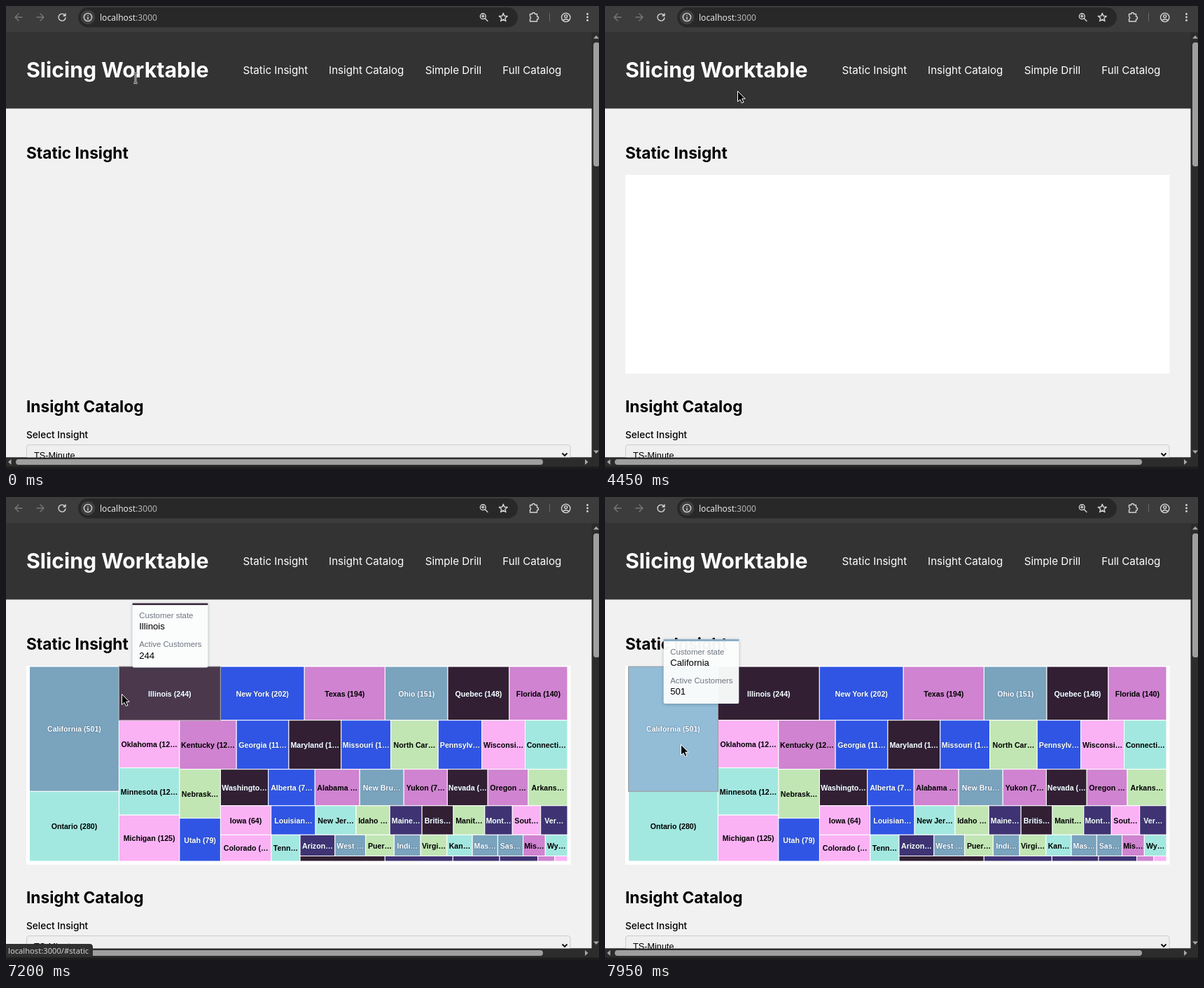
An HTML page for the animation above (8000 ms loop, 847x661 px).

```html
<!DOCTYPE html>
<html lang="en">
<head>
<meta charset="utf-8">
<title>Insight demo</title>
<style>
html, body { margin: 0; width: 100%; height: 100%; overflow: hidden; background: #333; }
svg { display: block; width: 847px; height: 661px; }
text { white-space: pre; }
.ui { font-family: Inter, sans-serif; font-optical-sizing: none; }
.chrome { font-family: "Noto Sans", sans-serif; }
.arial { font-family: "Liberation Sans", Arial, sans-serif; }
.cell { font-size: 10.65px; font-weight: 700; text-anchor: middle; }
.light { fill: #fff; stroke: rgba(20, 56, 93, .35); stroke-width: 1.2; paint-order: stroke; }
.icon { fill: none; stroke: #d6d6d6; stroke-width: 1.4; stroke-linecap: round; stroke-linejoin: round; }
.off { stroke: #777; }
#tip { filter: drop-shadow(0 1px 2px rgba(20, 56, 93, .35)); }
</style>
</head>
<body>
<svg id="stage" viewBox="0 0 847 661" xmlns="http://www.w3.org/2000/svg"></svg>
<script>
const LOOP = 8000, STEP = 50;
const REM = 15.15;
const LEFT = 28.9;
const COLORS = {
  s: '#7aa3bd', a: '#a3e8e0', d: '#321f33', b: '#3055e5',
  v: '#cf83d0', p: '#fab2f5', g: '#c1e6b4', u: '#3f3373'
};

const rect = (x, y, w, h, fill, more = '') =>
  `<rect x="${x}" y="${y}" width="${w}" height="${h}" fill="${fill}" ${more}/>`;
const text = (x, y, str, cls, size, fill, weight = 400) =>
  `<text x="${x}" y="${y}" class="${cls}" font-size="${size}" fill="${fill}" font-weight="${weight}">${str}</text>`;
const path = (d, more) => `<path d="${d}" ${more}/>`;
const dot = (x, y, r, more) => `<circle cx="${x}" cy="${y}" r="${r}" ${more}/>`;
const clamp = v => Math.max(0, Math.min(1, v));

// Chart data: each line is one strip of the treemap, each item a colour, a value and a label
const STRIPS = `col:s501 California (501)|a280 Ontario (280)
row:d244 Illinois (244)|b202 New York (202)|v194 Texas (194)|s151 Ohio (151)|d148 Quebec (148)|v140 Florida (140)
col:p129 Oklahoma (12…|a128 Minnesota (12…|p125 Michigan (125)
row:v125 Kentucky (12…|b115 Georgia (11…|d115 Maryland (1…|b109 Missouri (1…|g104 North Car…|b96 Pennsylv…|p95 Wisconsi…|a93 Connecti…
col:g90 Nebrask…|b79 Utah (79)
row:d78 Washingto…|b76 Alberta (7…|v73 Alabama …|s72 New Bru…|v71 Yukon (7…|d66 Nevada (…|v66 Oregon …|g64 Arkans…
row:p66 Iowa (64)|b58 Louisian…|a53 New Jer…|g44 Idaho …|u42 Maine…|d41 Britis…|g41 Manit…|u36 Mont…|p37 Sout…|u35 Ver…
col:p60 Colorado (…
col:a34 Tenn…
row:u33 Arizon…|s29 West …|g27 Puer…|s25 Indi…|g25 Virgi…|a24 Kan…|s24 Mas…|s24 Sas…|v21 Mis…|a21 Wy…
row:d20 |u16 |u11 |u9 |v4 |p3 `;

// Each strip is cut from the free area, as thick as its total value needs
function layout(x, y, w, h) {
  const sum = items => items.reduce((n, item) => n + item.value, 0);
  const strips = STRIPS.split('\n').map(line => ({
    col: line.startsWith('col'),
    items: line.slice(4).split('|').map(s => {
      const [, color, value, label] = s.match(/(\w)(\d+) (.*)/);
      return { color, value: +value, label };
    })
  }));
  const unit = w * h / sum(strips.flatMap(s => s.items));
  const cells = [];
  for (const { col, items } of strips) {
    const thick = sum(items) * unit / (col ? h : w);
    let at = col ? y : x;
    for (const item of items) {
      const len = item.value * unit / thick;
      cells.push(col ? { ...item, x, y: at, w: thick, h: len } : { ...item, x: at, y, w: len, h: thick });
      at += len;
    }
    if (col) { x += thick; w -= thick; } else { y += thick; h -= thick; }
  }
  return cells;
}
const cells = layout(33.5, 242, 768.5, 278);

const brighten = hex => '#' + hex.slice(1).match(/../g)
  .map(h => Math.min(255, parseInt(h, 16) + 25).toString(16).padStart(2, '0')).join('');

function cellShape({ x, y, w, h, color, label }, hot) {
  const fill = hot ? brighten(COLORS[color]) : COLORS[color];
  const cls = 'arial cell' + ('sdbu'.includes(color) ? ' light' : '');
  return rect(x, y, w, h, fill, `stroke="${hot ? '#999' : '#fff'}"`)
    + `<text class="${cls}" x="${x + w / 2}" y="${y + h / 2 + 4.2}">${label}</text>`;
}

function star(x, y, outer, inner) {
  const points = [...Array(10)].map((_, i) => {
    const r = i % 2 ? inner : outer, a = (i - 2.5) * Math.PI / 5;
    return `${x + r * Math.cos(a)} ${y + r * Math.sin(a)}`;
  });
  return path(`M${points.join('L')}Z`, 'class="icon"');
}

function browserBar() {
  return rect(0, 0, 847, 37.5, '#3c3c3c') + rect(103, 2, 628, 28.5, '#282828', 'rx="14.2"')
    + path('M23 16H13m5-5-5 5 5 5M44 16h10m-5-5 5 5-5 5', 'class="icon off"')
    + path('M84 13a5 5 0 1 0 1 4m0-6v3h-3', 'class="icon"')
    + dot(117, 16, 10.3, 'fill="#3f3f3f"') + dot(117, 16, 5.6, 'class="icon"')
    + path('M117 16v3m0-5.500v0', 'class="icon"')
    + text(134, 20.6, 'localhost<tspan fill="#b4b4b4">:3000</tspan>', 'chrome', 12.1, '#e8e8e8')
    + dot(681.3, 14.7, 3.9, 'class="icon"') + path('M684 17.500l4 4m-8.500-7h3.500m-1.750-1.750v3.500', 'class="icon"')
    + star(710.3, 16.5, 6.3, 2.7)
    + path('M748.500 11.500h3a2 2 0 0 1 4 0h3v3.500a2 2 0 0 1 0 4v3h-10v-3.500a2 2 0 0 0 0-3.500z', 'class="icon"')
    + rect(776, 10, 1, 12, '#6a6a6a')
    + dot(799.7, 16.3, 6.2, 'class="icon"') + dot(799.7, 14.6, 2, 'class="icon"') + path('M795.500 20.500q4-3.500 8.500 0', 'class="icon"')
    + [-1, 0, 1].map(i => dot(830.5, 16 + 4.5 * i, 1.4, 'fill="#d6d6d6"')).join('');
}

function page() {
  const nav = { 'Static Insight': 338.6, 'Insight Catalog': 461.1, 'Simple Drill': 598.7, 'Full Catalog': 709.3 };
  const heading = (y, str) => text(LEFT, y, str, 'ui', 1.5 * REM, '#000', 700);
  return rect(0, 0, 847, 661, '#2c2c2c') + rect(0, 37.5, 836.5, 109, '#333') + rect(0, 146.4, 836.5, 498.1, '#f1f1f1')
    + text(LEFT, 101.8, 'Slicing Worktable', 'ui', 2 * REM, '#fff', 700)
    + Object.entries(nav).map(([s, x]) => text(x, 97.4, s, 'ui', REM, '#fff')).join('')
    + heading(217.5, 'Static Insight') + heading(580.3, 'Insight Catalog')
    + text(LEFT, 617, 'Select Insight', 'ui', .9 * REM, '#000', 500)
    + rect(29.5, 626.5, 776.5, 29, '#efefef', 'stroke="#ccc" rx="3.5"')
    + text(40, 645.6, 'TS-Minute', 'arial', 12.7, '#000')
    + path('M794.500 638.500l3.500 3.500 3.500-3.500', 'fill="none" stroke="#000" stroke-width="1.8"');
}

function scrollbars() {
  const arrow = (x, y, turn) => path('M-4 2h8l-4-4.500z', `fill="#a8a8a8" transform="translate(${x} ${y}) rotate(${turn})"`);
  return rect(0, 644.5, 847, 16.5, '#2c2c2c') + rect(0, 657.5, 847, 3.5, '#1d1d1d')
    + rect(839, 52, 9, 177, '#9f9f9f', 'rx="4"') + rect(14, 647, 753, 8, '#9f9f9f', 'rx="4"')
    + arrow(843, 44.5, 0) + arrow(843, 636.5, 180) + arrow(5.5, 651, -90) + arrow(829, 651, 90);
}

const BEAM = 'M-2.500-7h1.500q1 0 1 1 0-1 1-1h1.500M0-6V6m-2.500 1h1.500q1 0 1-1 0 1 1 1h1.500';
const CURSORS = {
  arrow: path('M.500.500v15l3.500-3 2.300 5 2.700-1.200-2.300-5h4.500z', 'fill="#000" stroke="#fff" stroke-linejoin="round"'),
  beam: path(BEAM, 'fill="none" stroke="#fff" stroke-width="2.6"') + path(BEAM, 'fill="none" stroke="#111"'),
  hand: path('M-1.500 1.500q1.500-2 3 0v5.500l6 1q2 0 2 2v3q0 5.500-5 5.500h-2.500q-2.500 0-4-3l-3.500-4q0-2.500 4 0z', 'fill="#000" stroke="#fff"')
};

// Pointer moves: start, end, x, y; it rests in between
const MOVES = [
  [1250, 1300, 185, 107], [2050, 2250, 188, 115], [2700, 2750, 189, 121],
  [5100, 5500, 175, 192], [5500, 5950, 106, 126], [5950, 6050, 66, 107],
  [6150, 6400, 260, 91], [6400, 6650, 411, 93], [6950, 7200, 165, 281],
  [7200, 7400, 143, 428], [7500, 7900, 108, 353]
];
const TIP_MOVES = [[7250, 7450, 145.2, 300.3], [7450, 7600, 138, 335], [7600, 7800, 137.5, 203.2]];

function follow(moves, from, t) {
  return moves.reduce(([x, y], [start, end, toX, toY]) => {
    const f = clamp((t - start) / (end - start));
    return [x + (toX - x) * f, y + (toY - y) * f];
  }, from);
}

function cursorKind(x, y) {
  if (x > 28 && x < 294 && y > 74 && y < 110) return 'beam';
  return x > 338 && x < 433 && y > 80 && y < 105 ? 'hand' : 'arrow';
}

// Three dots swell one after another, once a second
function spinner(t) {
  return [0, 1, 2].map(i => {
    const phase = (t + 8250 - 200 * i) % 1000 - 500;
    return dot(404.3 + 13.35 * i, 383, 4 * clamp(1 - Math.abs(phase) / 360), 'fill="#94a1ad"');
  }).join('');
}

function tooltip({ label, color }, t) {
  const [, name, count] = label.match(/(.+) \((\d+)\)/);
  const [x, y] = follow(TIP_MOVES, [234.5, 151.7], t);
  const field = (top, key, value) =>
    text(9.5, top, key, 'arial', 11.4, '#6d7680') + text(9.5, top + 16.1, value, 'arial', 13.2, '#000');
  return `<g id="tip" transform="translate(${x - 53.8} ${y})">`
    + rect(0, 0, 107.6, 91.8, '#fff', 'rx="2" fill-opacity=".95"') + rect(0, 0, 107.6, 2.5, COLORS[color])
    + field(21.6, 'Customer state', name) + field(62.8, 'Active Customers', count) + '</g>';
}

const stage = document.getElementById('stage');
stage.innerHTML = page()
  + `<g id="panel">${rect(29, 241, 777.5, 284, '#fff')}</g><g id="dots"></g>`
  + `<g id="map">${cells.map(c => cellShape(c)).join('')}</g><g id="hover"></g>`
  + scrollbars() + browserBar()
  + `<g id="status">${path('M0 638h119.500q4.500 0 4.500 4.500V656H0z', 'fill="#303030"')}`
  + `${text(3, 651.8, 'localhost:3000/#static', 'chrome', 11.2, '#d2d2d2')}</g><g id="cursor"></g>`;
const [panel, dots, map, hover, status_, cursor] =
  ['panel', 'dots', 'map', 'hover', 'status', 'cursor'].map(id => document.getElementById(id));

const show = (el, on) => el.setAttribute('visibility', on ? 'visible' : 'hidden');

function render(t) {
  const [x, y] = follow(MOVES, [185, 103], t);
  show(panel, t >= 2050);
  dots.innerHTML = t >= 2050 && t < 4450 ? spinner(t) : '';
  show(map, t >= 4550);
  const hot = t >= 7000 && cells.find(c => x >= c.x && x < c.x + c.w && y >= c.y && y < c.y + c.h);
  hover.innerHTML = hot && hot.label.endsWith(')') ? cellShape(hot, true) + tooltip(hot, t) : '';
  status_.setAttribute('opacity', Math.min(clamp((t - 6700) / 150), clamp((7550 - t) / 300)));
  cursor.innerHTML = `<g transform="translate(${x} ${y})">${CURSORS[cursorKind(x, y)]}</g>`;
}

const start = performance.now();
function tick() {
  const t = (performance.now() - start) % LOOP;
  render(Math.floor(t / STEP) * STEP);
  requestAnimationFrame(tick);
}
tick();
</script>
</body>
</html>
```
